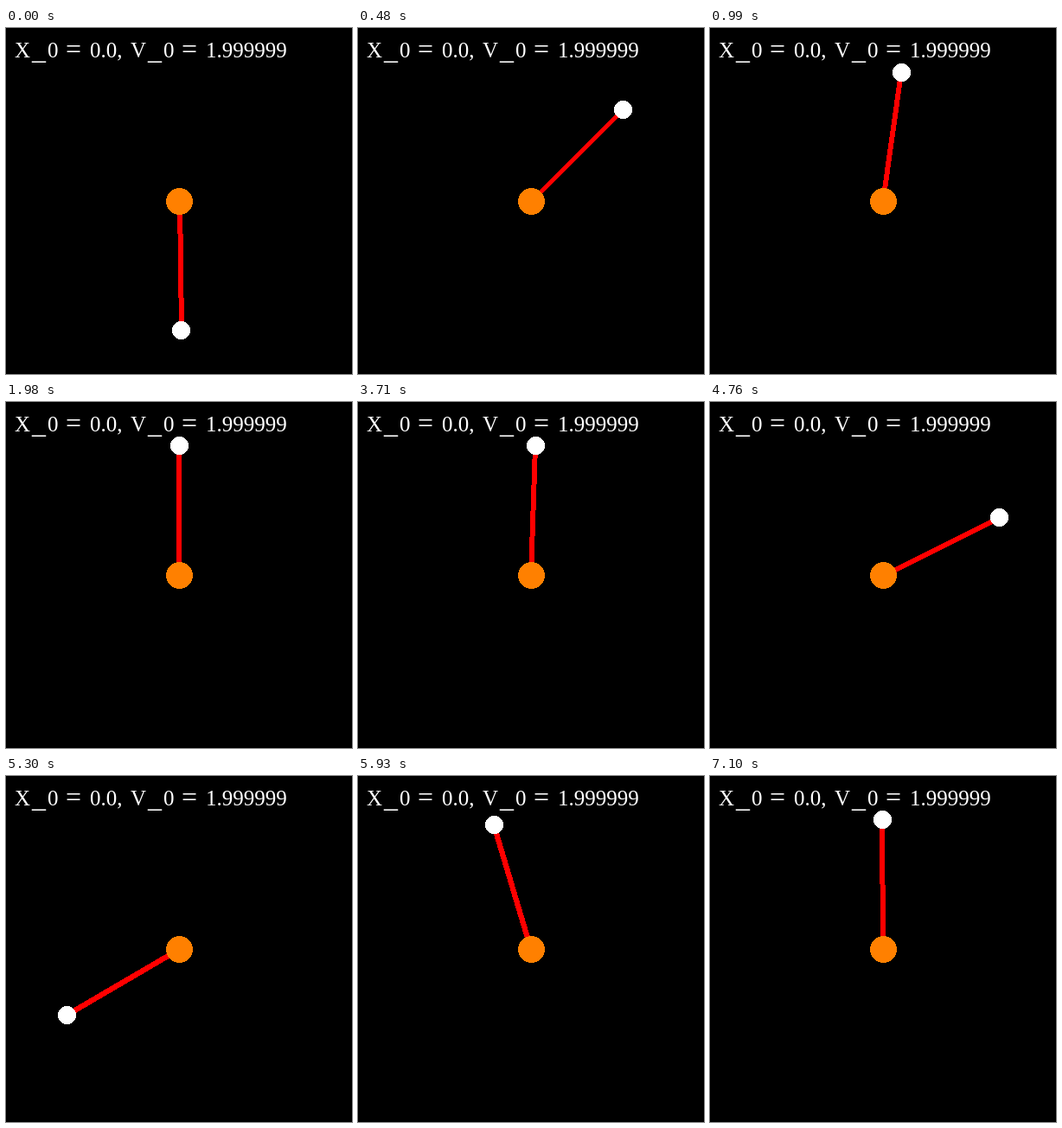
Animation of 400 by 400 pixels, one loop 8 s. Source, as an HTML page with a canvas:

```html
<!DOCTYPE html>
<html>
<head>
<meta charset="utf-8">
<title>Pendulum</title>
<style>
html, body { margin: 0; width: 100%; height: 100%; overflow: hidden; background: #000; }
canvas { display: block; }
</style>
</head>
<body>
<canvas width="400" height="400"></canvas>
<script>
const ctx = document.querySelector('canvas').getContext('2d');
const LOOP = 8000, PIVOT = 200, ARM = 150;
const HALF_PERIOD = 16.567; // in simulation units, just below the separatrix

const lean = u => 2 * Math.asin(1 / Math.cosh(u));

// Whole-pixel bob position for one simulation step
function bobAt(step) {
  const t = 0.01 + step * 0.1;
  const side = t < HALF_PERIOD ? 1 : -1;
  const u = t % HALF_PERIOD;
  const fromTop = lean(u) + lean(HALF_PERIOD - u);
  return {
    x: Math.floor(PIVOT + side * ARM * Math.sin(fromTop)),
    y: Math.floor(PIVOT - ARM * Math.cos(fromTop))
  };
}

// Equal neighbouring poses share one hold; holds are cut to 10 ms units
function buildTimeline() {
  const poses = [];
  let start = 0, step = 0;
  while (start < LOOP) {
    const pose = bobAt(step);
    let count = 0, next;
    do {
      count++;
      next = bobAt(++step);
    } while (next.x === pose.x && next.y === pose.y);
    poses.push({ ...pose, start });
    start += Math.floor(count * 3.3) * 10;
  }
  return poses;
}

// Hard-edged disc, symmetric in all eight octants
function disc(cx, cy, r, color) {
  ctx.fillStyle = color;
  const chord = d => Math.sqrt(Math.max(0, r * r - d * d));
  for (let dy = -r; dy <= r; dy++) {
    const d = Math.abs(dy);
    const half = Math.max(Math.round(chord(d)), Math.floor(chord(d - 0.5)));
    ctx.fillRect(cx - half, cy + dy, 2 * half + 1, 1);
  }
}

// Hard-edged convex polygon, filled row by row
function fillPolygon(points) {
  const rows = points.map(p => p[1]);
  for (let y = Math.min(...rows); y <= Math.max(...rows); y++) {
    const hits = [];
    points.forEach(([x0, y0], i) => {
      const [x1, y1] = points[(i + 1) % points.length];
      if (y < Math.min(y0, y1) || y > Math.max(y0, y1)) return;
      if (y0 === y1) hits.push(x0, x1);
      else hits.push(x0 + (x1 - x0) * (y - y0) / (y1 - y0));
    });
    const left = Math.floor(Math.min(...hits) + 0.5);
    const right = Math.ceil(Math.max(...hits) - 0.5);
    ctx.fillRect(left, y, right - left + 1, 1);
  }
}

// Six pixels wide: two to one side of the axis, three to the other
function rod(x, y) {
  const dx = x - PIVOT, dy = y - PIVOT, length = Math.hypot(dx, dy);
  const offset = (width, d) =>
    Math.sign(d) * Math.round(width * Math.abs(d) / length);
  const ax = -offset(2, dy), ay = offset(3, dx);
  const bx = offset(3, dy), by = -offset(2, dx);
  ctx.fillStyle = '#f00';
  fillPolygon([
    [PIVOT + ax, PIVOT + ay], [x + ax, y + ay],
    [x + bx, y + by], [PIVOT + bx, PIVOT + by]
  ]);
}

function write(text, x, y = 34, size = 25) {
  ctx.font = `${size}px "Liberation Serif", serif`;
  ctx.fillText(text, x, y);
}

function label() {
  ctx.fillStyle = '#fff';
  write('X', 10);
  write('0', 48);
  write('0.0,', 97);
  write('V', 144);
  write('0', 182);
  write('1.999999', 231);
  for (const x of [30, 164]) write('_', x, 36, 32);
  for (const x of [69, 203]) write('=', x, 35, 32);
}

const timeline = buildTimeline();

function draw(now) {
  const time = now % LOOP;
  const { x, y } = timeline.findLast(pose => pose.start <= time);
  ctx.fillStyle = '#000';
  ctx.fillRect(0, 0, 400, 400);
  label();
  rod(x, y);
  disc(PIVOT, PIVOT, 15, '#ff8000');
  disc(x, y, 10, '#fff');
}

const origin = performance.now();
function tick() {
  draw(performance.now() - origin);
  requestAnimationFrame(tick);
}
tick();
</script>
</body>
</html>
```
